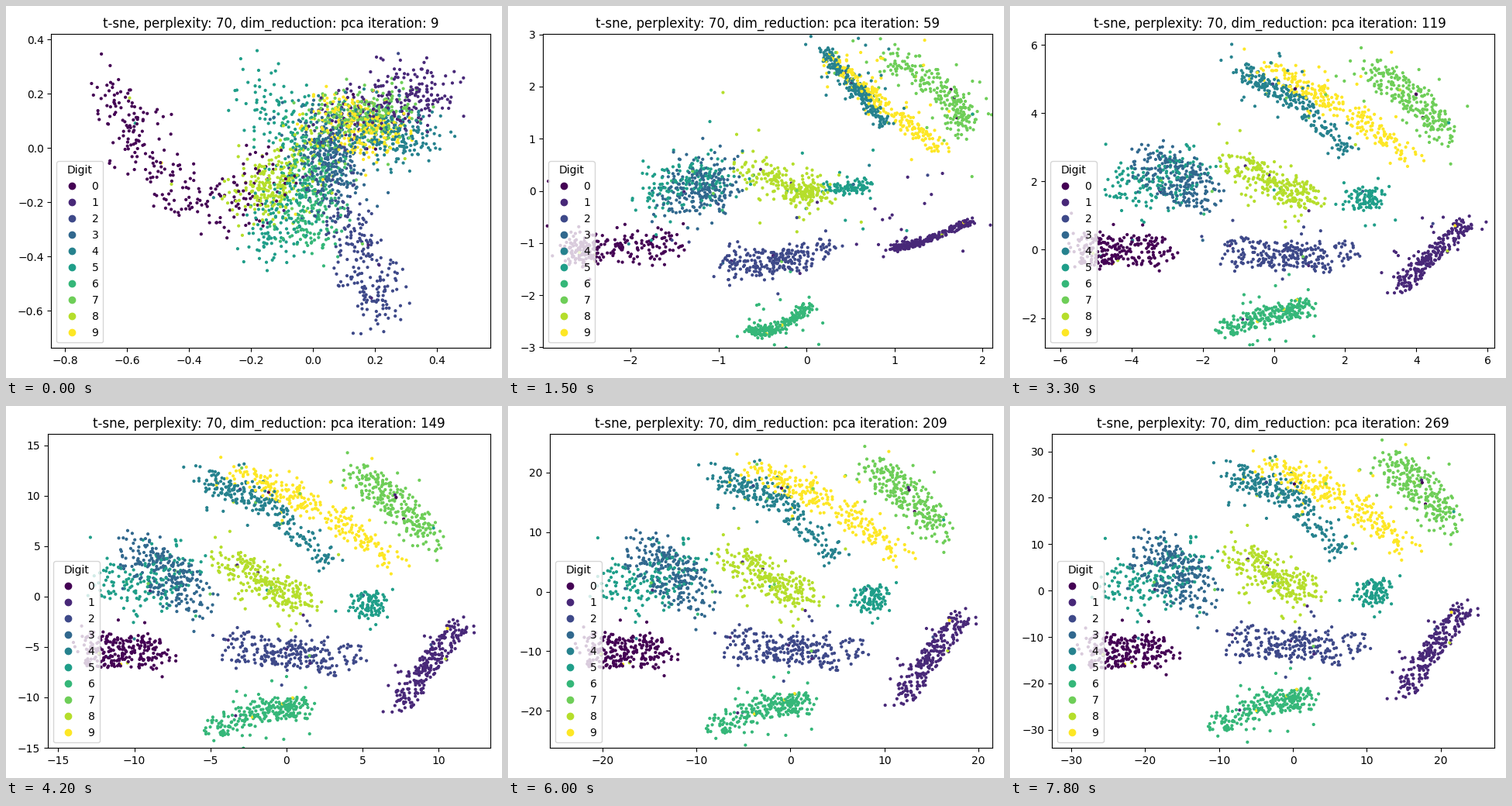
Animation, 640 px wide and 480 px high, one loop 8000 ms. Source, as a matplotlib script:

```python
import matplotlib.pyplot as plt
import numpy as np
from matplotlib.animation import FuncAnimation

rng = np.random.default_rng(70)

POSE_ITERATIONS = [9, 59, 99, 149, 269]
EASE_POWERS = [2.5, 1, 2, 1]
HUB = 395 + 145j  # where the starting cloud is thickest

# Left, right, bottom and top limits.
START = np.array([-0.845, 0.572, -0.737, 0.420])
PACKED = np.array([-2.992, 2.110, -3.015, 3.006])
SETTLED = np.array([-2.937, 2.052, -2.880, 2.925])
# After the early exaggeration the squared extents grow linearly.
SQUARED_EXTENT = np.array([245.9, 179.3, 225.6, 259.2])
SQUARED_GROWTH = np.array([6.82, 4.70, 7.70, 7.31])
SIDES = np.array([-1, 1, -1, 1])

clusters, digits = [], []


def stroke(corners, along):
    """Points at the given fractions of a polyline."""
    return np.interp(along, np.linspace(0, 1, len(corners)), corners)


def to_axes(pixels, left):
    return np.column_stack([(pixels.real - left) / (625 - left),
                            (441 - pixels.imag) / 406])


def cluster(digit, tip, packed, width, spread, count=250):
    """A digit runs from tip towards the hub, packs into a streak, then spreads."""
    along = rng.random(count)
    gauss = rng.normal(size=count) + 1j * rng.normal(size=count)
    disc = gauss / abs(gauss) * rng.random(count) ** 0.5
    halo = 25 * (rng.random(count) < 0.1)

    reach = 0.85 * along ** 1.5
    sag = 2j * reach * (1 - reach) * max(0, HUB.real - tip.real)
    start = tip + reach * (HUB - tip) + sag + 20 * gauss

    streak = stroke(packed, along) + (width + halo) * gauss
    final = stroke(spread, along) + (12 + 1.2 * width + halo) * disc
    settled = streak + 0.2 * (final - streak)
    shear = -0.2 * np.maximum(0, 240 - final.imag) + 0.05j * (final.real - 150)
    poses = [(start, 58), (streak, 45), (settled, 45),
             (final + shear, 54), (final, 54)]
    clusters.append([to_axes(pixels, left) for pixels, left in poses])
    digits.extend([digit] * count)


cluster(0, 140 + 110j, [82 + 314j, 110 + 313j, 220 + 308j], 10,
        [106 + 315j, 198 + 315j])
cluster(1, 552 + 112j, [495 + 312j, 535 + 304j, 598 + 276j], 2.5,
        [508 + 368j, 584 + 260j])
cluster(2, 480 + 385j, [280 + 330j, 345 + 330j, 410 + 312j], 10,
        [292 + 303j, 445 + 313j])
cluster(3, 425 + 235j, [215 + 242j, 275 + 228j], 18,
        [175 + 185j, 245 + 240j])
cluster(4, 530 + 170j, [406 + 56j, 489 + 152j], 5,
        [285 + 88j, 350 + 108j, 432 + 186j])
cluster(5, 335 + 300j, [180 + 242j, 280 + 215j], 15,
        [130 + 220j, 180 + 245j, 245 + 182j], 150)
cluster(5, 320 + 95j, [410 + 236j, 465 + 232j], 5,
        [455 + 242j, 480 + 238j], 100)
cluster(6, 394 + 290j, [312 + 417j, 340 + 420j, 390 + 388j], 4,
        [266 + 410j, 335 + 382j, 385 + 376j])
cluster(7, 500 + 140j, [490 + 70j, 575 + 115j, 590 + 155j], 11,
        [492 + 78j, 530 + 102j, 568 + 150j])
cluster(8, 320 + 235j, [305 + 205j, 370 + 238j, 400 + 240j], 10,
        [292 + 193j, 385 + 240j])
cluster(9, 485 + 158j, [414 + 62j, 480 + 122j, 560 + 185j], 6,
        [328 + 74j, 415 + 108j, 515 + 183j])

# Mix the drawing order and let a few points sit in a foreign cluster.
order = rng.permutation(len(digits))
poses = np.concatenate(clusters, axis=1)[:, order]
digits = np.array(digits)[order]
strays = rng.random(len(digits)) < 0.03
digits[strays] = rng.integers(0, 10, strays.sum())


def ease_out(t, power):
    return 1 - (1 - t) ** power


def limits(iteration):
    if iteration <= 59:
        return START + ease_out((iteration - 9) / 50, 2.5) * (PACKED - START)
    held = PACKED + min(1, (iteration - 59) / 40) * (SETTLED - PACKED)
    squared = SQUARED_EXTENT + SQUARED_GROWTH * (iteration - 149)
    return SIDES * np.maximum(abs(held), np.sqrt(np.maximum(0, squared)))


def positions(iteration):
    last = len(EASE_POWERS) - 1
    i = min(np.searchsorted(POSE_ITERATIONS, iteration, side="right") - 1, last)
    begin, end = POSE_ITERATIONS[i:i + 2]
    t = ease_out((iteration - begin) / (end - begin), EASE_POWERS[i])
    return poses[i] + t * (poses[i + 1] - poses[i])


fig, ax = plt.subplots(figsize=(6.4, 4.8), dpi=100)
scatter = ax.scatter(*poses[0].T, s=4, c=digits, cmap="viridis",
                     transform=ax.transAxes)
ax.legend(*scatter.legend_elements(num=None), loc="lower left", title="Digit")


def draw(frame):
    iteration = 9 + 10 * (frame // 3)
    left, right, bottom, top = limits(iteration)
    ax.set(xlim=(left, right), ylim=(bottom, top))
    ax.set_title("t-sne, perplexity: 70, dim_reduction: pca "
                 f"iteration: {iteration}")
    scatter.set_offsets(positions(iteration))
    fig.tight_layout()
    fig.subplots_adjust(top=fig.subplotpars.top + 1 / 480)
    return [scatter]


animation = FuncAnimation(fig, draw, frames=80, interval=100, repeat=True,
                          repeat_delay=0, init_func=lambda: draw(0))
plt.show()
```
